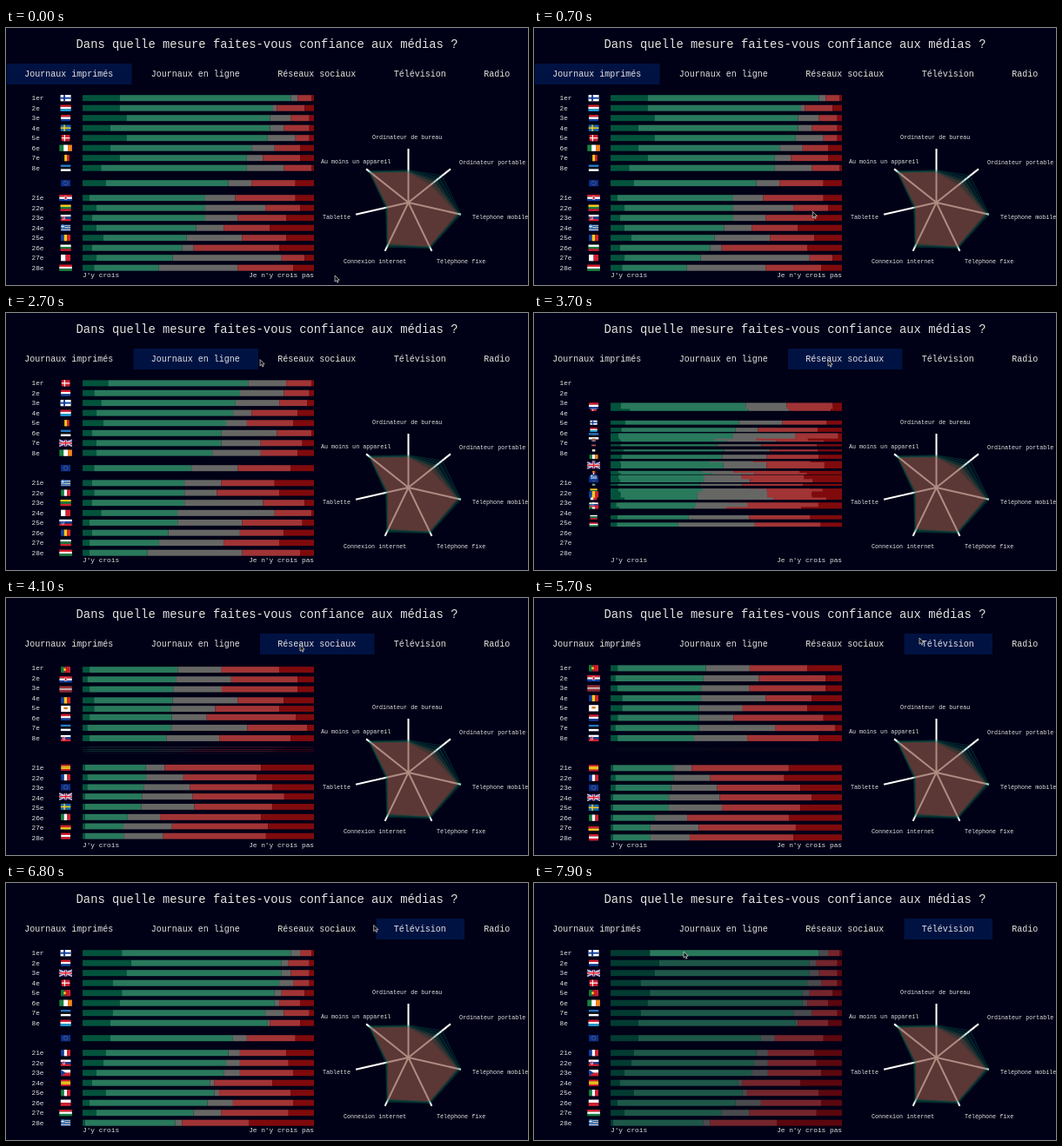
An HTML page for the animation above (8 s loop, 600 by 296 pixels).

```html
<!DOCTYPE html>
<html lang="fr">
<head>
<meta charset="utf-8">
<title>Confiance aux médias</title>
<style>
  html, body { margin: 0; width: 100%; height: 100%; overflow: hidden; background: #000016; }
  svg { display: block; font: 7.8px "Liberation Mono", monospace; fill: #e4e4e4; }
  .title { font-size: 13.8px; }
  .tab { font-size: 10px; }
  .axis { font-size: 6.7px; }
</style>
</head>
<body>
<svg id="stage" width="600" height="296" viewBox="0 0 600 296"></svg>
<script>
// Per medium, in rank order: cumulative % after each of the first four answers
const media = [
  { name: 'Journaux imprimés', start: -1000, rows: {
    FI: [16, 90, 93, 99], LU: [16, 82, 84, 96], NL: [19, 81, 90, 98], SE: [12, 81, 87, 98],
    DK: [19, 80, 92, 98], IE: [12, 73, 83, 94], BE: [16, 71, 78, 94], EE: [8, 71, 87, 99],
    EU: [10, 63, 73, 92],
    HR: [3, 53, 66, 92], LT: [6, 53, 79, 94], SK: [4, 53, 67, 88], GR: [6, 49, 61, 81],
    RO: [9, 45, 69, 88], BG: [4, 43, 48, 85], MT: [6, 39, 86, 96], HU: [5, 33, 67, 91] } },
  { name: 'Journaux en ligne', start: 1800, rows: {
    DK: [11, 71.5, 88, 99], NL: [5, 68, 87, 98], FI: [8, 66, 85, 97], LU: [6, 65, 73, 93],
    BE: [9, 62, 71, 91], EE: [4, 60, 84, 99], UK: [6, 60, 77, 95], IE: [6, 56, 77, 93],
    EU: [5, 47, 67, 90],
    GR: [4, 44, 60, 83], IT: [5, 44, 58, 85], LT: [4, 44, 78, 96], MT: [8, 41, 83, 99],
    SI: [3, 41, 69, 95], RO: [4, 37, 68, 87], BG: [3, 33, 61, 85], HU: [3, 28, 69, 94] } },
  { name: 'Réseaux sociaux', start: 3270, rows: {
    PT: [3, 41, 60, 85], HR: [2, 40, 64, 93], LV: [3, 39, 60, 93], RO: [5, 39, 67, 87],
    CY: [5, 38, 57, 85], NL: [3, 38, 53, 92], EE: [2, 38, 71, 97], SK: [3, 36, 59, 90],
    ES: [1, 27, 35, 77], FR: [2, 27, 43, 75], EU: [2, 26, 46, 82], UK: [1, 25, 47, 87],
    SE: [1, 25, 48, 82], IT: [1, 19, 33, 77], DE: [1, 17, 38, 80], AT: [1, 17, 34, 79] } },
  { name: 'Télévision', start: 5600, rows: {
    FI: [17, 90, 94, 99], NL: [21, 86, 89, 98], UK: [19, 86, 90, 98], DK: [13, 85, 91, 98],
    PT: [17, 83, 86, 96], IE: [16, 83, 85, 94], EE: [13, 79, 87, 98], LU: [12, 80, 81, 94],
    EU: [12, 65, 71, 92],
    FR: [10, 63, 68, 88], SK: [9, 62, 68, 89], CZ: [6, 61, 68, 91], ES: [4, 55, 57, 82],
    IT: [10, 57, 59, 90], PL: [3, 54, 65, 91], HU: [6, 48, 60, 89], GR: [1, 40, 43, 72] } },
  { name: 'Radio' },
];
const answerColors = ['#03533c', '#29795c', '#666764', '#a13435', '#7f0a0c'];

const mix = (a, b, k) => a + (b - a) * k;
const clamp = k => Math.max(0, Math.min(1, k));
const cubicInOut = k => k < .5 ? 4 * k ** 3 : 1 - 4 * (1 - k) ** 3;
const rect = (x, y, w, h, fill) => `<rect x="${x}" y="${y}" width="${w}" height="${h}" fill="${fill}"/>`;
const text = (x, y, s, cls = '', anchor = 'start') =>
  `<text x="${x}" y="${y}" class="${cls}" text-anchor="${anchor}">${s}</text>`;

// Flags are one unit high and centred on the origin
const red = '#d5202f', blue = '#123f9c', white = '#fff', green = '#16813f', yellow = '#fccb1c';
const flag = (w, body) => `<g transform="translate(${-w / 2} -.5)">${body}</g>`;
const vertical = (w, colors, extra = '') =>
  flag(w, colors.map((c, i) => rect(w * i / colors.length, 0, w / colors.length, 1, c)).join('') + extra);
const horizontal = (w, colors, extra = '') =>
  flag(w, colors.map((c, i) => rect(0, i / colors.length, w, 1 / colors.length, c)).join('') + extra);
const cross = (w, x, y, size, c) => rect(0, y - size / 2, w, size, c) + rect(x - size / 2, 0, size, 1, c);
const nordic = (w, ground, c, size) => horizontal(w, [ground], cross(w, w * .37, .5, size, c));
const shield = (x, c) => rect(x, .22, .4, .54, white) + rect(x + .06, .26, .28, .44, c);
const saltire = (c, size) => `<path d="M0 0L2 1M0 1L2 0" stroke="${c}" stroke-width="${size}"/>`;

const flags = {
  AT: horizontal(1.5, [red, white, red]),
  BE: vertical(1.15, ['#111', yellow, red]),
  BG: horizontal(1.67, [white, green, red]),
  HR: horizontal(2, [red, white, blue], shield(.8, red)),
  CY: horizontal(1.5, [white], '<ellipse cx=".75" cy=".42" rx=".36" ry=".17" fill="#d57800"/>'),
  CZ: horizontal(1.5, [white, red], `<path d="M0 0L.75 .5L0 1" fill="${blue}"/>`),
  DK: nordic(1.32, red, white, .16),
  EE: horizontal(1.57, ['#2378c8', '#111', white]),
  EU: horizontal(1.5, ['#0b2f8c'],
    `<circle cx=".75" cy=".5" r=".31" fill="none" stroke="${yellow}" stroke-width=".08" stroke-dasharray=".07 .092"/>`),
  FI: nordic(1.64, white, blue, .27),
  FR: vertical(1.5, [blue, white, red]),
  DE: horizontal(1.67, ['#111', red, yellow]),
  GR: horizontal(1.5, Array.from({ length: 9 }, (_, i) => i % 2 ? white : '#1a5fb4'),
    rect(0, 0, .56, .56, '#1a5fb4') + rect(0, .22, .56, .11, white) + rect(.22, 0, .11, .56, white)),
  HU: horizontal(2, [red, white, green]),
  IE: vertical(2, [green, white, '#f58220']),
  IT: vertical(1.5, [green, white, red]),
  LV: horizontal(2, ['#9e3039', '#9e3039', white, '#9e3039', '#9e3039']),
  LT: horizontal(1.67, [yellow, green, red]),
  LU: horizontal(1.67, [red, white, '#1ca3de']),
  MT: vertical(1.5, [white, red]),
  NL: horizontal(1.5, [red, white, blue]),
  PL: horizontal(1.6, [white, red]),
  PT: vertical(1.5, [green, green, red, red, red], `<circle cx=".6" cy=".5" r=".2" fill="${yellow}"/>`),
  RO: vertical(1.5, [blue, yellow, red]),
  SK: horizontal(1.6, [white, blue, red], shield(.3, red)),
  SI: horizontal(2, [white, blue, red], shield(.35, blue)),
  ES: horizontal(1.5, [red, yellow, yellow, red]),
  SE: nordic(1.6, '#1769a8', yellow, .2),
  UK: horizontal(2, [blue], saltire(white, .2) + saltire(red, .07) + cross(2, 1, .5, .34, white) + cross(2, 1, .5, .2, red)),
};
const codes = Object.keys(flags);

// Slots 0-7 lead the ranking, 8 is the middle row, 9-16 close it
const slotY = s => 80.7 + 11.5 * s + (s === 8 ? 6 : s > 8 ? 11.5 : 0);

// Every country as [y, scale, ...cuts]; the ones between rank 8 and 21 collapse
const layouts = media.slice(0, 4).map(({ rows }) => {
  const ranked = Object.keys(rows), shift = ranked[8] === 'EU' ? 0 : 1;
  return codes.map((code, i) => {
    const rank = ranked.indexOf(code), k = i / codes.length;
    if (rank >= 0) return [slotY(rank < 8 ? rank : rank + shift), 1, ...rows[code]];
    const low = rows[ranked[9 - shift]];
    return [172.5 + 5 * k, 0, ...rows[ranked[7]].map((v, j) => mix(v, low[j], k))];
  });
});

function tabsMarkup() {
  let x = 1;
  return media.map(({ name }) => {
    const w = name.length * 6 + 41.5, left = x;
    x += w + 2;
    return `<rect class="highlight" x="${left}" y="41" width="${w}" height="24" fill="#001242"/>` +
      text(left + 20.3, 56, name, 'tab');
  }).join('');
}

function radarMarkup() {
  const labels = [
    ['Ordinateur de bureau', 421, 128], ['Ordinateur portable', 521, 157], ['Téléphone mobile', 536, 220],
    ['Téléphone fixe', 495, 271], ['Connexion internet', 388, 271], ['Tablette', 364, 220],
    ['Au moins un appareil', 362, 156]];
  const outer = [.6, .8, 1, .94, .92, .43, .94], inner = [.55, .53, .92, .89, .84, .38, .87];
  const point = (i, r) => {
    const a = (i / 7 - .25) * 2 * Math.PI;
    return `${462.5 + 62 * r * Math.cos(a)},${201 + 62 * r * Math.sin(a)}`;
  };
  const polygon = (k, color, fill, line) =>
    `<polygon points="${outer.map((v, i) => point(i, mix(v, inner[i], k))).join(' ')}" fill="${color}"
      fill-opacity="${fill}" stroke="${color}" stroke-opacity="${line}" stroke-width=".6"/>`;
  const axes = labels.map((_, i) => `M${point(i, 0)}L${point(i, 1)}`).join('');
  return `<path d="${axes}" stroke="#fff" stroke-width="2"/>` +
    [0, .25, .5, .75].map(k => polygon(k, '#0a7a5c', .1, .5)).join('') +
    [.55, .7, .85, 1, 1.1].map(k => polygon(k, '#b04a40', .13, .15)).join('') +
    labels.map(([s, x, y]) => text(x, y, s, 'axis')).join('');
}

const stage = document.getElementById('stage');
stage.innerHTML =
  text(300, 23, 'Dans quelle mesure faites-vous confiance aux médias ?', 'title', 'middle') +
  tabsMarkup() +
  Array.from({ length: 16 }, (_, i) =>
    text(29.5, slotY(i < 8 ? i : i + 1) + 2.4, i ? (i < 8 ? i + 1 : i + 13) + 'e' : '1er')).join('') +
  text(88, 287, "J'y crois") + text(354, 287, "Je n'y crois pas", '', 'end') +
  radarMarkup() +
  codes.map(code => '<g class="row">' + answerColors.map(c => rect(0, 0, 0, 0, c)).join('') +
    `<g>${flags[code]}</g></g>`).join('') +
  '<path id="cursor" d="M0 0V7.2L1.7 5.7L2.8 8.2L4 7.7L2.9 5.2H5.2Z" fill="#111" stroke="#ddd" stroke-width=".7"/>';

const highlights = [...stage.querySelectorAll('.highlight')];
const rows = [...stage.querySelectorAll('.row')].map(g => [...g.children]);
const cursor = document.getElementById('cursor');

// [time, x, y]
const cursorPath = [[100, 378, 285], [1700, 196, 53], [2050, 196, 53], [3100, 338, 54], [4300, 338, 54],
  [5450, 443, 46], [6650, 443, 46], [7550, 172, 79], [8000, 172, 79]];

function cursorAt(t) {
  const i = Math.max(1, cursorPath.findIndex(p => p[0] > t));
  const [t0, x0, y0] = cursorPath[i - 1], [t1, x1, y1] = cursorPath[i];
  const k = clamp((t - t0) / (t1 - t0)), e = k * k * (3 - 2 * k);
  return [mix(x0, x1, e), mix(y0, y1, e)];
}

function draw(t) {
  const active = media.findLastIndex(m => m.start <= t);
  const k = cubicInOut(clamp((t - media[active].start) / 1000));
  const from = layouts[Math.max(0, active - 1)], to = layouts[active];
  const dimmed = 1 - .28 * clamp((t - 7200) / 250);

  highlights.forEach((h, i) => h.setAttribute('visibility', i === active ? 'visible' : 'hidden'));
  rows.forEach((parts, i) => {
    const [y, scale, ...cuts] = to[i].map((v, j) => mix(from[i][j], v, k));
    const edges = [0, ...cuts, 100].map(v => 88 + v * 2.66);
    answerColors.forEach((_, j) => {
      const bar = parts[j], hovered = codes[i] === 'FI' && j === 1;
      bar.setAttribute('x', edges[j]);
      bar.setAttribute('y', y - 3.5 * scale);
      bar.setAttribute('width', edges[j + 1] - edges[j]);
      bar.setAttribute('height', 7 * scale);
      bar.setAttribute('opacity', hovered ? 1 : dimmed);
    });
    parts[5].setAttribute('transform', `translate(68.6 ${y}) scale(${7.3 * scale})`);
  });
  cursor.setAttribute('transform', `translate(${cursorAt(t)})`);
}

function loop() {
  draw(performance.now() % 8000);
  requestAnimationFrame(loop);
}
loop();
</script>
</body>
</html>
```
